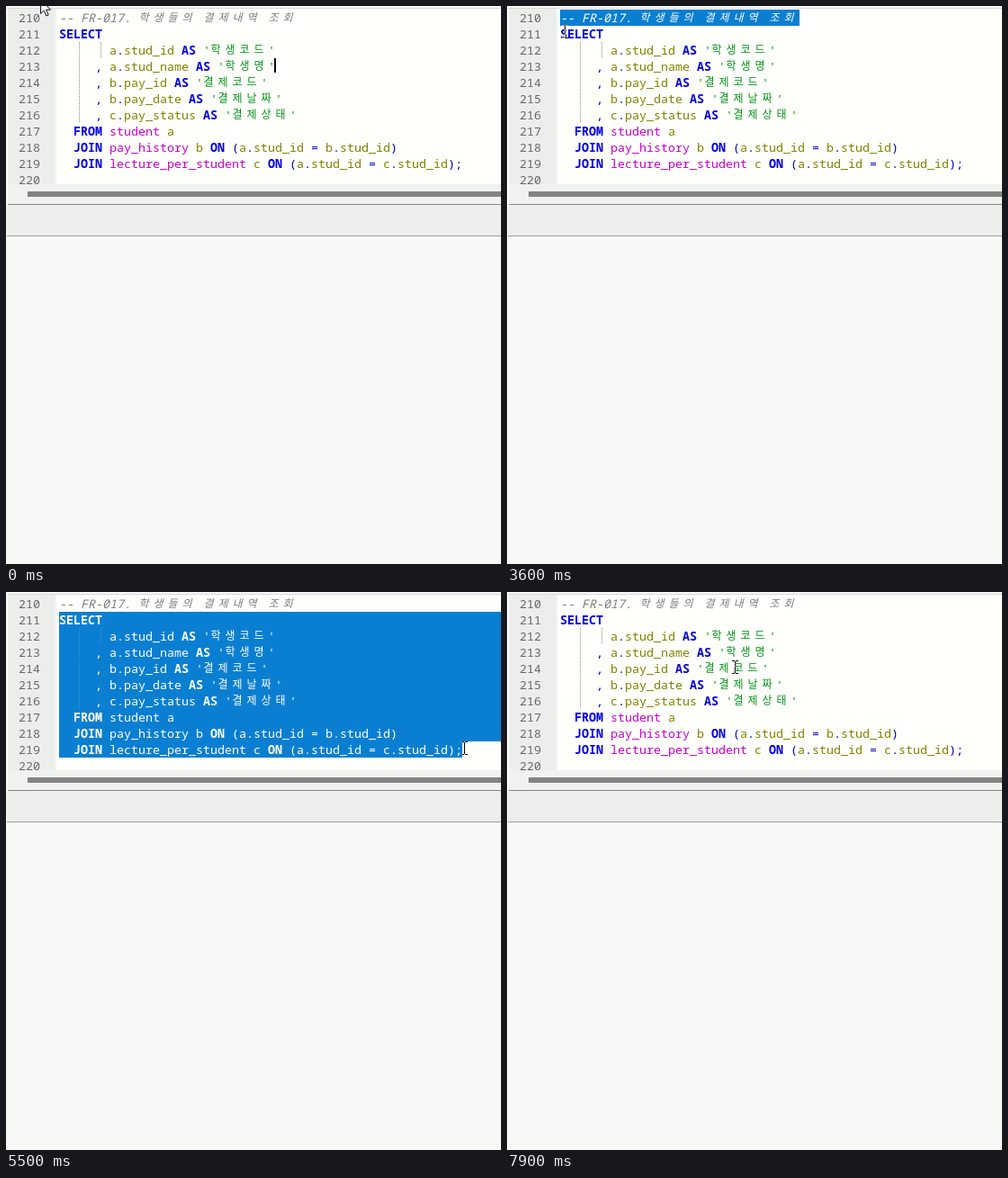
Write an HTML page that moves like this. It is 550 by 620 pixels and loops after 8 s.

```html
<!DOCTYPE html>
<html lang="ko">
<head>
<meta charset="utf-8">
<style>
html, body { margin: 0; width: 550px; height: 620px; overflow: hidden; background: #f7f9f7; }
svg { display: block; }
text { font: 13.3333px "Noto Sans Mono", "DejaVu Sans Mono", monospace; }
.ko { font: 12px "Noto Sans CJK KR", "Noto Sans CJK", sans-serif; }
.key { fill: #0000e4; font-weight: 700; }
.sym { fill: #0000c4; font-weight: 500; }
.id { fill: #808000; }
.table { fill: #c800c8; }
.str { fill: #009218; }
.note { fill: #7c7c7c; font-style: italic; }
.num { fill: #666a68; }
.guide { stroke: #8c8c8c; stroke-dasharray: 1 1; }
#lit text { fill: #fff; }
#lit .guide { stroke: #3b93d6; }
.invert { mix-blend-mode: difference; fill: #fff; }
</style>
</head>
<body>
<svg width="550" height="620" viewBox="0 0 550 620">
  <defs>
    <clipPath id="selClip"><path id="selShape"/></clipPath>
    <clipPath id="page"><rect y="3" width="550" height="195"/></clipPath>
  </defs>
  <rect width="550" height="620" fill="#f7f9f7"/>
  <g shape-rendering="crispEdges">
    <rect x="1" y="2" width="549" height="1" fill="#d6d8d6"/>
    <rect x="2" y="3" width="548" height="217" fill="#f0f2f0"/>
    <rect x="3" y="3" width="52" height="195" fill="#eceeec"/>
    <rect x="55" y="3" width="495" height="195" fill="#fffffb"/>
    <rect x="55" y="3" width="2" height="195" fill="#f7f9f7"/>
    <rect x="24" y="206" width="526" height="6" fill="#828482"/>
    <rect x="2" y="220" width="548" height="1" fill="#868886"/>
    <rect x="1" y="221" width="549" height="34" fill="#eceeec"/>
    <rect x="1" y="255" width="549" height="1" fill="#a0a2a0"/>
  </g>
  <g clip-path="url(#page)">
    <g id="nums"></g>
    <g id="code"></g>
    <path id="sel" fill="#0a7fd1" shape-rendering="crispEdges"/>
    <g id="lit" clip-path="url(#selClip)"></g>
  </g>
  <rect id="caret" class="invert" width="2" height="16" shape-rendering="crispEdges"/>
  <path id="beam" class="invert" shape-rendering="crispEdges"
    d="M-3-7h3v1h1v-1h3v1h-3v13h3v1h-3v-1h-1v1h-3v-1h3v-13h-3z"/>
  <path id="arrow" d="M.5.5V16.5L4.2 13.2 6.8 19 9.2 18 6.6 12.2H11.5Z" fill="#fff" stroke="#111"/>
</svg>
<script>
const $ = id => document.getElementById(id);
const LEFT = 59, TOP = 4, ROW = 18, CELL = 8, RIGHT = 550, BLINK = 530, LAG = 50;

const lines = [
  "-- FR-017. 학생들의 결제내역 조회",
  "SELECT",
  "       a.stud_id AS '학생코드'",
  "     , a.stud_name AS '학생명'",
  "     , b.pay_id AS '결제코드'",
  "     , b.pay_date AS '결제날짜'",
  "     , c.pay_status AS '결제상태'",
  "  FROM student a",
  "  JOIN pay_history b ON (a.stud_id = b.stud_id)",
  "  JOIN lecture_per_student c ON (a.stud_id = c.stud_id);",
  ""
];

const isKo = s => /[가-힣]/.test(s);

// x of every character boundary; Hangul fills two cells
const edges = lines.map(s => {
  const xs = [LEFT];
  for (const c of s) xs.push(xs[xs.length - 1] + (isKo(c) ? 2 : 1) * CELL);
  return xs;
});
edges[0][edges[0].length - 1] += 2;

function kind(word, row) {
  if (row === 0) return "note";
  if (word === "'" || isKo(word)) return "str";
  if (/^(SELECT|AS|FROM|JOIN|ON)$/.test(word)) return "key";
  if (/^(student|pay_history|lecture_per_student)$/.test(word)) return "table";
  return /^\w/.test(word) ? "id" : "sym";
}

function lineMarkup(line, row) {
  const base = TOP + 14 + row * ROW;
  return [...line.matchAll(/[가-힣]+|\w+|[^\s]/g)].map(m => {
    const word = m[0], ko = isKo(word);
    const x = ko ? [...word].map((c, i) => edges[row][m.index + i] + 0.5).join(" ") : edges[row][m.index];
    return `<text class="${kind(word, row)}${ko ? " ko" : ""}" x="${x}" y="${base - (ko ? 1 : 0)}">${word}</text>`;
  }).join("");
}

const guides = '<path class="guide" d="M81.5 40V130M105.5 40V58"/>';
const markup = guides + lines.map(lineMarkup).join("");
$("code").innerHTML = markup;
$("lit").innerHTML = markup;
$("nums").innerHTML = lines.map((s, i) =>
  `<text class="num" x="14" y="${TOP + 14 + i * ROW}">${210 + i}</text>`).join("");

// time, x, y, eased arrival
const path = [
  [0, 38, -8], [100, 38, -8], [850, 61, 13, 1], [930, 61, 13],
  [1300, 193, 14], [1850, 342, 14], [2250, 342, 14],
  [3150, 64, 28, 1], [3750, 64, 28],
  [4100, 186, 77], [4200, 214, 82], [4900, 509, 173],
  [5600, 509, 173], [6150, 253, 83, 1], [8000, 253, 83]
];

function pointer(t) {
  const i = Math.max(1, path.findIndex(p => p[0] >= t));
  const a = path[i - 1], b = path[i];
  let k = (t - a[0]) / (b[0] - a[0]);
  if (b[3]) k = k * k * (3 - 2 * k);
  return { x: a[1] + (b[1] - a[1]) * k, y: a[2] + (b[2] - a[2]) * k };
}

function caretAt(p) {
  const row = Math.min(9, Math.max(0, Math.floor((p.y - TOP) / ROW)));
  const x = edges[row].reduce((best, e) => Math.abs(e - p.x) < Math.abs(best - p.x) ? e : best);
  return { row, x };
}

const drags = [
  { from: 930, to: 1900, row: 0 },
  { from: 3750, to: 4950, row: 1 }
];
const CLICK = 6240;

function state(t) {
  if (t < drags[0].from) return { caret: { row: 3, x: 299 }, since: -230 };
  if (t >= CLICK) return { caret: caretAt(pointer(CLICK)), since: CLICK };
  const d = drags[t < drags[1].from ? 0 : 1];
  const p = pointer(Math.max(d.from, Math.min(t, d.to) - LAG));
  return { caret: caretAt(p), since: Math.min(t, d.to - LAG), anchor: d.row };
}

function selection(s) {
  if (s.anchor === undefined) return "";
  let d = "";
  for (let r = s.anchor; r <= s.caret.row; r++) {
    const end = r < s.caret.row ? RIGHT : s.caret.x;
    d += `M${LEFT} ${TOP + r * ROW}H${end}v${ROW}H${LEFT}z`;
  }
  return d;
}

function show(el, on) {
  el.setAttribute("visibility", on ? "visible" : "hidden");
}

function draw(t) {
  const p = pointer(t), s = state(t), d = selection(s);
  $("sel").setAttribute("d", d);
  $("selShape").setAttribute("d", d);

  $("caret").setAttribute("x", s.caret.x - 1);
  $("caret").setAttribute("y", TOP + s.caret.row * ROW);
  show($("caret"), Math.floor((t - s.since) / BLINK) % 2 === 0);

  const inText = p.x > 56;
  for (const id of ["beam", "arrow"])
    $(id).setAttribute("transform", `translate(${Math.round(p.x)} ${Math.round(p.y)})`);
  show($("beam"), inText);
  show($("arrow"), !inText);
}

const start = performance.now();
function tick() {
  draw((performance.now() - start) % 8000);
  requestAnimationFrame(tick);
}
tick();
</script>
</body>
</html>
```
